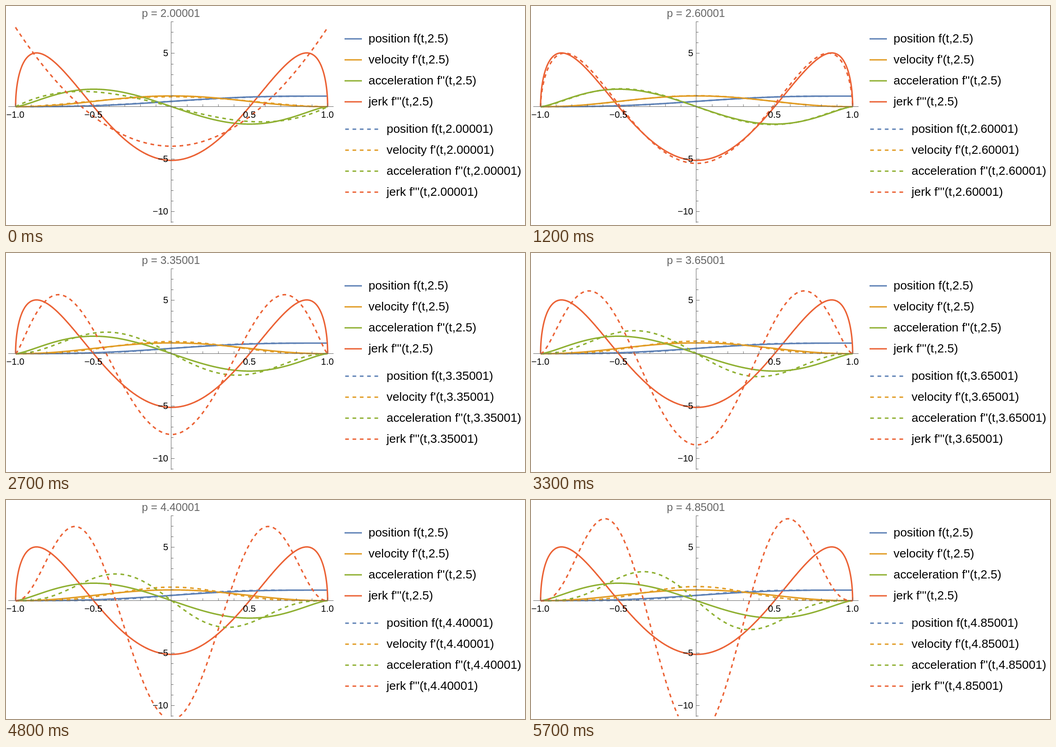
Write an HTML page that moves like this. It is 1136 by 480 pixels and loops after 6 s.

```html
<!DOCTYPE html>
<html lang="en">
<head>
<meta charset="utf-8">
<title>Motion profiles</title>
<style>
  html, body { margin: 0; width: 100%; height: 100%; overflow: hidden; background: #fff; }
  svg { display: block; width: 1136px; height: 480px; }
  text { font-family: "Liberation Sans", Arial, sans-serif; font-kerning: none; }
  .curve { fill: none; stroke-width: 3.2; stroke-linejoin: round; }
  .dashed { stroke-dasharray: 8 8; }
  .axis { stroke: #666; stroke-width: 1; }
  .label { font-size: 20px; }
  .legend { font-size: 26.4px; }
  #title { font-size: 24px; fill: #666; text-anchor: middle; }
</style>
</head>
<body>
<svg id="stage" viewBox="0 0 1136 480">
  <defs><clipPath id="plot"><rect x="5" y="34" width="713" height="441"/></clipPath></defs>
  <text id="title" x="361" y="24"></text>
  <g id="curves" clip-path="url(#plot)"></g>
  <g id="axes"></g>
  <g id="legend"></g>
</svg>
<script>
const SAMPLES = 2000, STEP_MS = 300, STEPS = 20, BOTTOM = 475;
const series = [
  ['position f', '#5E81B5'],
  ["velocity f'", '#E19C24'],
  ["acceleration f''", '#8FB032'],
  ["jerk f'''", '#EB6235']
];
const $ = id => document.getElementById(id);
const X = t => 362.5 + 341.5 * t;
const Y = v => 220.6 - 23.12 * v;

function add(parent, tag, attrs, text = '') {
  const el = document.createElementNS('http://www.w3.org/2000/svg', tag);
  for (const key in attrs) el.setAttribute(key, attrs[key]);
  el.textContent = text;
  return parent.appendChild(el);
}

// Velocity is (1 - t²)^p scaled to unit area; the others follow from it.
function profile(p) {
  const ts = [], rows = [[], [], [], []];
  let area = 0;
  for (let i = 0; i <= SAMPLES; i++) {
    const t = Math.sin(Math.PI * (i / SAMPLES - 0.5)) * (1 - 1e-7);
    const w = 1 - t * t, v = w ** p;
    if (i) area += (v + rows[1][i - 1]) / 2 * (t - ts[i - 1]);
    ts.push(t);
    rows[0].push(area);
    rows[1].push(v);
    rows[2].push(-2 * p * t * w ** (p - 1));
    rows[3].push(-2 * p * w ** (p - 1) + 4 * p * (p - 1) * t * t * w ** (p - 2));
  }
  // Dashes restart where a curve re-enters the plot.
  return rows.map(row => {
    let d = '', pen = 'M';
    row.forEach((v, i) => {
      const y = Y(v / area);
      if (y > BOTTOM) { pen = 'M'; return; }
      d += pen + X(ts[i]).toFixed(2) + ' ' + y.toFixed(2);
      pen = 'L';
    });
    return d;
  });
}

function addCurves(extra) {
  return series.map(([, stroke]) => add($('curves'), 'path', { class: 'curve ' + extra, stroke }));
}

function addLegend(top, x1, x2, textX, extra) {
  return series.map(([, stroke], i) => {
    const y = top + 46 * i;
    add($('legend'), 'path', { class: 'curve ' + extra, stroke, d: `M${x1} ${y}H${x2}` });
    return add($('legend'), 'text', { class: 'legend', x: textX, y: y + 8 });
  });
}

const setLegend = (texts, p) => texts.forEach((el, i) => el.textContent = `${series[i][0]}(t,${p})`);
const setCurves = (paths, p) => profile(p).forEach((d, i) => paths[i].setAttribute('d', d));

function drawAxes() {
  const axes = $('axes');
  const line = d => add(axes, 'path', { class: 'axis', d });
  const label = (x, y, anchor, text) =>
    add(axes, 'text', { class: 'label', x, y, 'text-anchor': anchor }, text.replace('-', '\u2212'));
  line('M5 220.5H717');
  line('M361.5 34V475');
  for (let i = -10; i <= 10; i++) {
    if (!i) continue;
    const major = i % 5 === 0;
    line(`M${X(i / 10)} 220.5v${major ? -7 : -5}`);
    if (major) label(X(i / 10) - 0.5, 245, 'middle', (i / 10).toFixed(1));
  }
  for (let v = -11; v <= 8; v++) {
    if (!v) continue;
    const major = v % 5 === 0, y = Math.floor(Y(v)) - 0.5;
    line(`M361.5 ${y}h${major ? 7.5 : 5}`);
    if (major) label(355, y + 6.5, 'end', String(v));
  }
}

setCurves(addCurves(''), 2.5);
setLegend(addLegend(72, 741, 779, 793.5, ''), 2.5);
const moving = addCurves('dashed');
const movingLegend = addLegend(270, 742.5, 817, 833, 'dashed');
drawAxes();

let shown = -1;
function frame() {
  const step = Math.floor(performance.now() / STEP_MS) % STEPS;
  if (step !== shown) {
    shown = step;
    const p = 2.00001 + 0.15 * step, text = p.toFixed(5);
    $('title').textContent = 'p = ' + text;
    setLegend(movingLegend, text);
    setCurves(moving, p);
  }
  requestAnimationFrame(frame);
}
frame();
</script>
</body>
</html>
```
